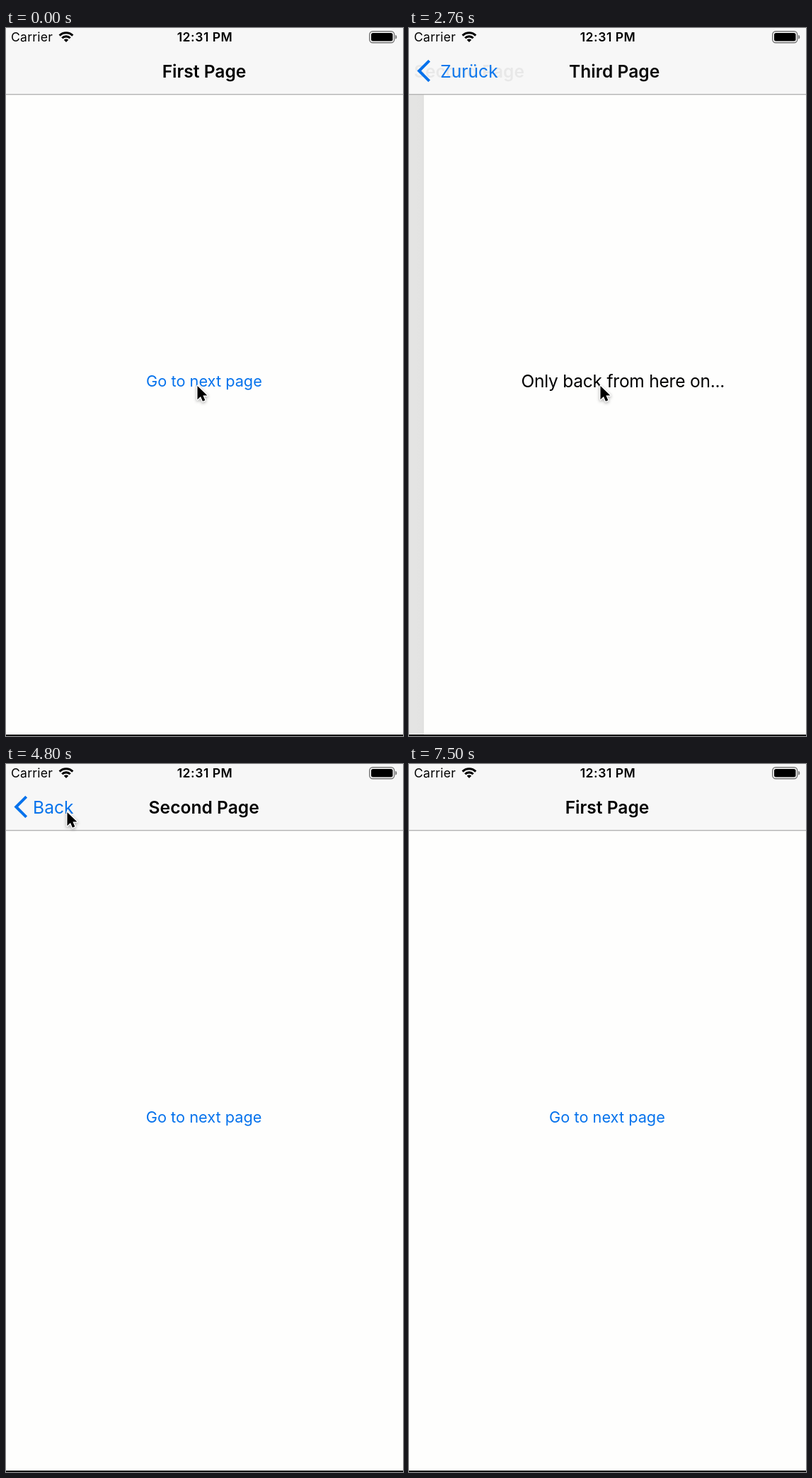
Write an HTML page with a canvas that moves like this. It is 561 by 999 pixels and loops after 7600 ms.

```html
<!DOCTYPE html>
<html lang="en">
<head>
<meta charset="utf-8">
<title>Page navigation</title>
<style>
html, body { margin: 0; width: 100%; height: 100%; overflow: hidden; background: #fefefd; }
canvas { display: block; width: 561px; height: 999px; }
</style>
</head>
<body>
<canvas id="stage" width="561" height="999"></canvas>
<script>
const ctx = document.getElementById('stage').getContext('2d');
const W = 561, H = 999, BAR = 94, FLOOR = 997, LOOP = 7600;
const MID = 280, PARALLAX = 0.3, TITLE_TRAVEL = 340;
const BLUE = '#0572ec', FONT = 'Inter, "Liberation Sans", sans-serif';

const pages = [
  { title: 'First Page', link: true },
  { title: 'Second Page', link: true, back: 'Back', backX: 67 },
  { title: 'Third Page', back: 'Zurück', backX: 79 }
];

const moves = [
  { at: 924, from: 0, to: 1 },
  { at: 2483, from: 1, to: 2 },
  { at: 4349, from: 2, to: 1 },
  { at: 5742, from: 1, to: 0 }
];
const DURATION = 500, PRESS = 90;

const clamp = v => Math.min(1, Math.max(0, v));
const mix = (a, b, k) => a + (b - a) * k;
const smooth = v => { v = clamp(v); return v * v * (3 - 2 * v); };

// Critically damped spring
function spring(ms) {
  if (ms <= 0) return 0;
  if (ms >= DURATION) return 1;
  const x = Math.sqrt(1000 / 3) * ms / 1000;
  return 1 - (1 + x) * Math.exp(-x);
}

// The bar trails the pages at first, then settles sooner
const barProgress = p => p + p * (1 - p) * (1.5 * p * p - p - 0.2);

function text(str, x, y, size, opt = {}) {
  const { weight = 400, color = '#000', alpha = 1, align = 'center', spacing = 0 } = opt;
  if (alpha <= 0) return;
  ctx.save();
  ctx.globalAlpha = clamp(alpha);
  ctx.font = `${weight} ${size}px ${FONT}`;
  ctx.letterSpacing = spacing + 'px';
  ctx.textAlign = align;
  ctx.fillStyle = color;
  ctx.fillText(str, x, y);
  ctx.restore();
}

function roundBox(x, y, w, h, r) {
  ctx.beginPath();
  ctx.roundRect(x, y, w, h, r);
}

function drawPage(page, x, linkAlpha) {
  ctx.fillStyle = '#fefefd';
  ctx.fillRect(x, BAR, W, FLOOR - BAR);
  if (page.link) {
    text('Go to next page', x + MID, 506, 21.75, { color: BLUE, alpha: linkAlpha });
  } else {
    text('Only back from here on...', x + MID + 1, 506.5, 24.5, { spacing: -0.22 });
  }
}

function drawShadow(x, alpha) {
  const size = 14, g = ctx.createLinearGradient(x - size, 0, x, 0);
  g.addColorStop(0, 'rgba(0,0,0,0)');
  g.addColorStop(0.6, `rgba(0,0,0,${0.09 * alpha})`);
  g.addColorStop(1, `rgba(0,0,0,${0.29 * alpha})`);
  ctx.fillStyle = g;
  ctx.fillRect(x - size, BAR, size, FLOOR - BAR);
}

function drawTitle(page, x, alpha) {
  text(page.title, x, 69.5, 24.6, { weight: 600, alpha });
}

function drawBack(page, x, alpha) {
  if (page.back) text(page.back, x, 69.5, 24.6, { color: BLUE, alpha });
}

function drawChevron(alpha) {
  if (alpha <= 0) return;
  ctx.save();
  ctx.globalAlpha = clamp(alpha);
  ctx.strokeStyle = BLUE;
  ctx.lineWidth = 4;
  ctx.beginPath();
  ctx.moveTo(28.7, 46.2);
  ctx.lineTo(14.3, 60.5);
  ctx.lineTo(28.7, 74.8);
  ctx.stroke();
  ctx.restore();
}

function drawStatus() {
  text('Carrier', 7, 19.3, 17.6, { align: 'left', spacing: 0.2 });
  text('12:31 PM', 281, 19.3, 17.6, { weight: 600, spacing: 0.5 });

  const a = -Math.PI * 0.75, b = -Math.PI * 0.25;
  ctx.fillStyle = ctx.strokeStyle = '#000';
  ctx.lineWidth = 3.1;
  for (const r of [13.2, 8.1]) {
    ctx.beginPath();
    ctx.arc(85, 20, r, a, b);
    ctx.stroke();
  }
  ctx.beginPath();
  ctx.moveTo(85, 20);
  ctx.arc(85, 20, 4.6, a, b);
  ctx.fill();

  ctx.strokeStyle = '#777';
  ctx.lineWidth = 1.4;
  roundBox(513.7, 4.8, 35, 16, 4.5);
  ctx.stroke();
  roundBox(516, 7, 30.5, 11.6, 2.5);
  ctx.fill();
  ctx.fillStyle = '#777';
  roundBox(550.2, 10, 2, 5.6, [0, 2, 2, 0]);
  ctx.fill();
}

function drawBarBase() {
  ctx.fillStyle = '#f7f7f7';
  ctx.fillRect(0, 0, W, BAR);
  ctx.fillStyle = '#b4b4b4';
  ctx.fillRect(0, 93, W, 1.4);
}

function drawCursor(t) {
  const go = smooth((t - 3300) / 680);
  const leave = clamp((t - 6080) / 270) ** 2;
  if (leave >= 1) return;
  const x = mix(270.5, 86.5, go) + 25 * leave;
  const y = mix(505, 68, go) - 100 * leave;
  const shape = [[0, 0], [0, 17], [4, 13.2], [6.6, 19.2], [9.6, 18], [7, 12], [12.3, 12]];
  ctx.save();
  ctx.translate(x, y);
  ctx.scale(1.13, 1.13);
  ctx.beginPath();
  shape.forEach(p => ctx.lineTo(...p));
  ctx.closePath();
  ctx.lineJoin = 'round';
  ctx.lineWidth = 2.4;
  ctx.strokeStyle = '#fff';
  ctx.shadowColor = 'rgba(0,0,0,.35)';
  ctx.shadowBlur = 4;
  ctx.shadowOffsetY = 1.5;
  ctx.stroke();
  ctx.shadowColor = 'transparent';
  ctx.fillStyle = '#000';
  ctx.fill();
  ctx.restore();
}

// Opacity of a tapped control around its release
function pressAlpha(ms, low, fade) {
  return ms < -PRESS ? 1 : mix(low, 1, clamp(ms / fade));
}

function drawStill(index, linkAlpha, backAlpha) {
  const page = pages[index];
  drawPage(page, 0, linkAlpha);
  drawBarBase();
  drawTitle(page, MID, 1);
  drawBack(page, page.backX, backAlpha);
  if (page.back) drawChevron(backAlpha);
}

function drawMove(move, p, linkAlpha, backAlpha) {
  const push = move.to > move.from;
  const lower = pages[Math.min(move.from, move.to)];
  const upper = pages[Math.max(move.from, move.to)];
  const n = barProgress(p);
  const shown = push ? p : 1 - p;
  const barShown = push ? n : 1 - n;
  const edge = W * (1 - shown);
  const fadeOut = 1 - p ** 1.6;

  drawPage(lower, -W * PARALLAX * shown, push ? linkAlpha : 1);
  ctx.fillStyle = `rgba(0,0,0,${0.105 * shown})`;
  ctx.fillRect(0, BAR, edge, FLOOR - BAR);
  drawShadow(edge, 1 - p);
  drawPage(upper, edge, 1);

  drawBarBase();
  const labelX = mix(MID, upper.backX, barShown);
  drawBack(lower, lower.backX - 110 * barShown, 1 - 2 * shown);
  drawTitle(lower, labelX, push ? fadeOut : p);
  drawBack(upper, labelX, shown * backAlpha);
  drawTitle(upper, MID + TITLE_TRAVEL * (1 - barShown), push ? p : fadeOut);
  drawChevron((lower.back ? 1 : shown) * backAlpha);
}

function draw(t) {
  ctx.fillStyle = '#000';
  ctx.fillRect(0, 0, W, H);

  let move = moves[0];
  for (const m of moves) if (t >= m.at - PRESS) move = m;
  const ms = t - move.at, p = spring(ms);
  const push = move.to > move.from;
  const linkAlpha = push ? pressAlpha(ms, 0.2, 250) : 1;
  const backAlpha = push ? 1 : pressAlpha(ms, 0.24, 110);

  if (p <= 0) drawStill(move.from, linkAlpha, backAlpha);
  else if (p >= 1) drawStill(move.to, 1, 1);
  else drawMove(move, p, linkAlpha, backAlpha);

  drawStatus();
  drawCursor(t);
}

const start = performance.now();
function tick() {
  draw((performance.now() - start) % LOOP);
  requestAnimationFrame(tick);
}
tick();
</script>
</body>
</html>
```
